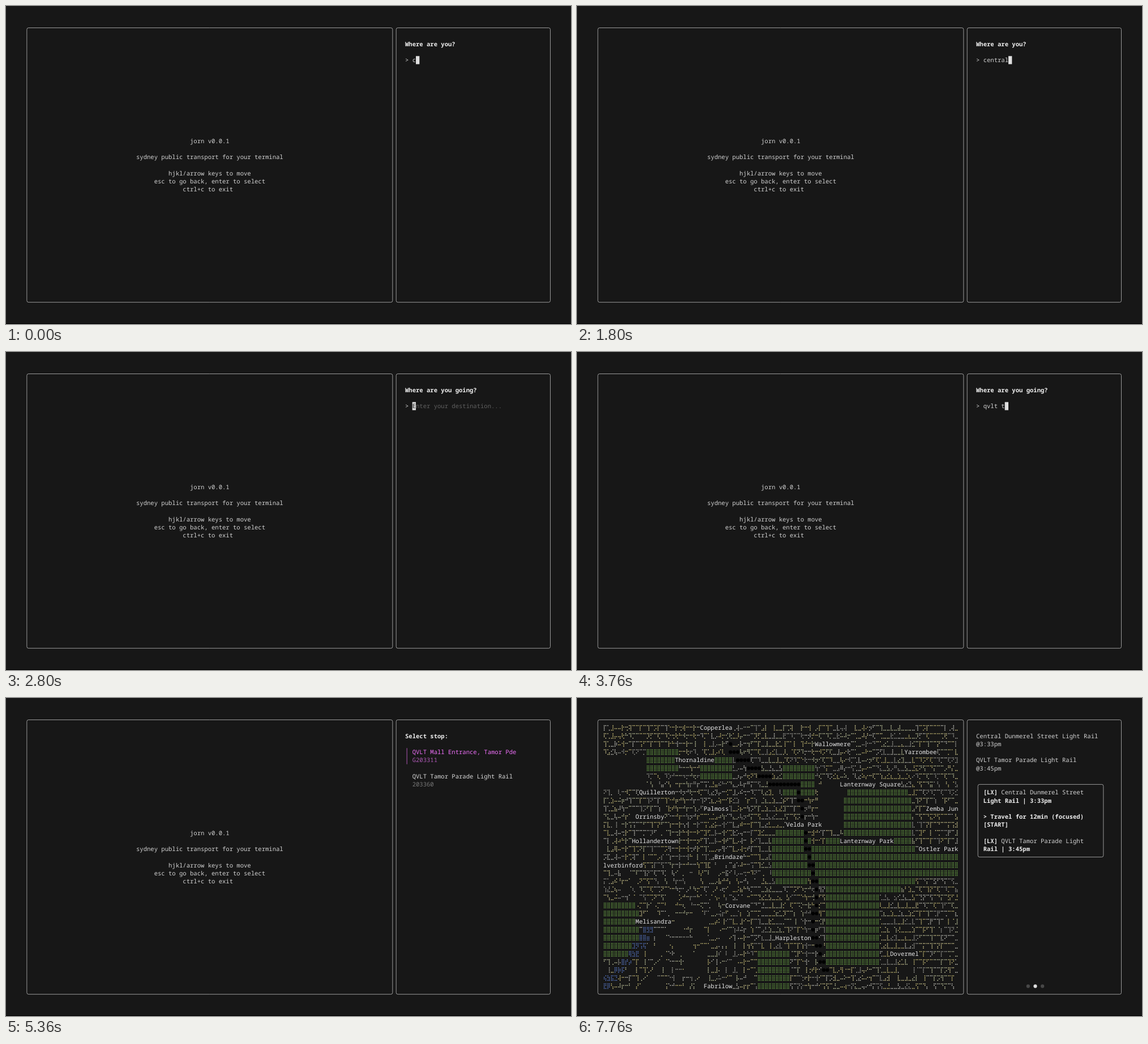
These frames come from a looping animation (998x561 px, 8 s). An HTML page with a canvas:

```html
<!DOCTYPE html>
<html lang="en">
<head>
<meta charset="utf-8">
<title>Transport terminal</title>
<style>
  html, body { margin: 0; width: 100%; height: 100%; overflow: hidden; background: #171717; }
  canvas { display: block; }
</style>
</head>
<body>
<canvas id="stage" width="998" height="561"></canvas>
<script>
const ctx = document.getElementById('stage').getContext('2d');
const LOOP = 8000;
const CELL_W = 19 / 3, CELL_H = 14.24, LEFT = 33.667, TOP = 38.5;
const BG = '#171717', TEXT = '#d2d2d2', BRIGHT = '#eeeeee', LINE = '#c4c4c4';
const PINK = '#ee6ff8', PLUM = '#ad58b4', DIM = '#777777';

const colX = col => LEFT + col * CELL_W;
const midX = col => colX(col + 0.5);
const rowY = row => TOP + row * CELL_H;

// Every glyph sits on the terminal grid.
function write(text, col, row, color = TEXT, bold = false) {
  ctx.font = `${bold ? 'bold ' : ''}${CELL_W / 0.6}px "Noto Sans Mono", monospace`;
  ctx.textRendering = 'geometricPrecision';
  ctx.fillStyle = color;
  [...text].forEach((ch, i) => {
    if (ch !== ' ') ctx.fillText(ch, colX(col + i), rowY(row) + 3.7);
  });
}

function frame(col0, row0, col1, row1) {
  ctx.strokeStyle = LINE;
  ctx.lineWidth = 0.75;
  ctx.beginPath();
  ctx.roundRect(midX(col0), rowY(row0), midX(col1) - midX(col0), rowY(row1) - rowY(row0), 3);
  ctx.stroke();
}

function dot(col, row, radius, color) {
  ctx.fillStyle = color;
  ctx.beginPath();
  ctx.arc(midX(col), rowY(row), radius, 0, Math.PI * 2);
  ctx.fill();
}

function drawIntro() {
  write('jorn v0.0.1', 46, 14);
  write('sydney public transport for your terminal', 31, 16);
  write('hjkl/arrow keys to move', 40, 18);
  write('esc to go back, enter to select', 36, 19);
  write('ctrl+c to exit', 44, 20);
}

function drawPrompt(title, typed, cursorOn, hint) {
  write(title, 106, 2, BRIGHT, true);
  write('> ' + typed, 106, 4);
  const col = 108 + typed.length;
  if (!typed) write(hint, col, 4, '#606060');
  if (cursorOn) {
    ctx.fillStyle = '#e0e0e0';
    ctx.fillRect(colX(col), rowY(4) - CELL_H / 2, CELL_W, CELL_H);
    if (!typed) write(hint[0], col, 4, BG);
  }
}

function drawList(stops, selected, pages = 0) {
  write('Select stop:', 106, 2, BRIGHT, true);
  stops.forEach(([name, id], i) => {
    const row = 4 + i * 3, active = i === selected;
    write(name, 108, row, active ? PINK : '#d8d8d8');
    write(id, 108, row + 1, active ? PLUM : DIM);
    if (active) {
      ctx.fillStyle = PLUM;
      ctx.fillRect(midX(106) - 0.5, rowY(row) - CELL_H / 2, 1, CELL_H * 2);
    }
  });
  for (let i = 0; i < pages; i++) dot(108 + i, 27, 1.3, i ? '#606060' : '#a8a8a8');
}

// Rounded map areas: centre column and row, then half width and half height.
const parks = [
  [76, 11.5, 10, 4.3], [72, 17, 15, 3.2], [86, 17, 14, 1.7], [69, 25, 8, 5],
  [52, 16, 5.5, 3.6], [54, 6.5, 5, 2.5], [16, 4, 4.5, 2], [31, 5, 5, 1.8],
  [4, 25, 6, 3.5], [47, 30, 5, 3]
];
const clearings = [[5, 5.5, 7, 2], [64, 9.5, 4.5, 3]];
const trackPoints = [[35, 2], [35, 3], [46, 6.5], [54, 7.5], [57, 16], [59, 20], [58, 25], [62, 31]];

const labels = [
  ['Copperlea', 27, 0], ['Wallowmere', 59, 2], ['Yarrombee', 84, 3], ['Thornaldine', 20, 4],
  ['Lanternway Square', 66, 7], ['Quillerton', 10, 8], ['Palmoss', 28, 10], ['Zemba Jun', 90, 10],
  ['Orrinsby', 9, 11], ['Velda Park', 51, 12], ['Hollandertown', 8, 14], ['Lanternway Park', 66, 14],
  ['Ostler Park', 88, 15], ['Brindaze', 31, 16], ['lverbinford', 0, 17], ['Corvane', 34, 22],
  ['Melisandra', 9, 24], ['Harpleston', 48, 26], ['Dovermel', 80, 28], ['Fabrilow', 28, 32]
];
const streetColors = ['#ece2a0', '#dcdcd2', '#e2d584', '#b4b4ac', '#d8deb0'];

const within = (areas, c, r) => areas.some(([cx, cy, rx, ry]) =>
  ((c - cx) / rx) ** 4 + ((r - cy) / ry) ** 4 < 1);
const mod = (a, n) => ((a % n) + n) % n;
const hash = (a, b) => mod(Math.sin(a * 127.1 + b * 311.7) * 43758.5453, 1);

function trackCol(row) {
  const next = Math.max(1, trackPoints.findIndex(([, r]) => r >= row));
  const [c0, r0] = trackPoints[next - 1], [c1, r1] = trackPoints[next];
  return c0 + (c1 - c0) * (row - r0) / (r1 - r0);
}

// Streets thin out towards the south-west.
function streetDensity(c, r) {
  if (within(clearings, c, r)) return 0;
  const thinning = Math.min(1, Math.max(0, (r - 15) / 5));
  return 0.9 - 0.5 * thinning * Math.exp(-(((c - 20) / 18) ** 2));
}

// Warped line families, broken into random segments.
function onStreet(u, v, density) {
  const across = v + 0.12 * u + 2.5 * Math.sin(u * 0.09);
  const down = u - 0.2 * v + 2 * Math.sin(v * 0.11);
  const slant = u + 0.9 * v;
  const hit = (line, gap, along, seed) => mod(line, gap) < 1
    && hash(Math.floor(line / gap) + seed, Math.floor(along / 5)) < density;
  return hit(across, 4, u, 0) || hit(down, 5, v, 50) || hit(slant, 15, v, 90);
}

function drawCell(c, r) {
  const park = within(parks, c, r);
  const water = r >= 25 && Math.abs(c - 12 + (r - 25) ** 1.3) < 1.8;
  const density = streetDensity(c, r);
  ctx.fillStyle = water ? '#6286e0' : park ? '#76b74d'
    : streetColors[Math.floor(hash(c >> 1, r + 9) * streetColors.length)];
  for (let i = 0; i < 2; i++) {
    for (let j = 0; j < 4; j++) {
      const u = c * 2 + i, v = r * 4 + j;
      const lit = water ? hash(u, v) < 0.75 : park || onStreet(u, v, density);
      if (lit) ctx.fillRect(colX(c + 2) + 1.1 + i * 2.7, rowY(r + 1) - 4.8 + j * 2.7, 1.45, 1.45);
    }
  }
}

function drawMap() {
  const taken = new Set();
  const key = (c, r) => r * 99 + c;
  for (const [name, col, row] of labels) {
    for (let i = 0; i < name.length; i++) taken.add(key(col + i, row));
    write(name, col + 2, row + 1, '#e6e6e6');
  }
  for (let r = 2; r <= 30; r++) {
    const ends = [trackCol(r - 0.5), trackCol(r + 0.5)].map(Math.round);
    for (let c = Math.min(...ends); c <= Math.max(...ends); c++) {
      if (taken.has(key(c, r))) continue;
      taken.add(key(c, r));
      dot(c + 2, r + 1, 3.1, '#000000');
    }
  }
  for (let r = 0; r < 33; r++) {
    for (let c = 0; c < 99; c++) if (!taken.has(key(c, r))) drawCell(c, r);
  }
}

function drawTrip() {
  write('Central Dunmerel Street Light Rail', 106, 2);
  write('@3:33pm', 106, 3);
  write('QVLT Tamor Parade Light Rail', 106, 5);
  write('@3:45pm', 106, 6);
  frame(106, 8, 141, 17);
  write('[LX]', 108, 9, BRIGHT, true);
  write('Central Dunmerel Street', 113, 9);
  write('Light Rail | 3:33pm', 108, 10, BRIGHT, true);
  write('> Travel for 12min (focused)', 108, 12, BRIGHT, true);
  write('[START]', 108, 13, BRIGHT, true);
  write('[LX]', 108, 15, BRIGHT, true);
  write('QVLT Tamor Parade Light', 113, 15);
  write('Rail | 3:45pm', 108, 16, BRIGHT, true);
  for (let i = 0; i < 3; i++) dot(120 + i * 2, 33, 3.1, i === 1 ? '#dddddd' : '#484848');
}

const origins = [
  ['Central Landing', '200060'], ['Varrowdel Central', 'G2200114'], ['Tolbeck Central', 'G35006'],
  ['Wendalberry Central', 'G300217'], ['Pennow Central School', 'G28435'],
  ['Quorby Central School', 'G248084'], ['Ellow Central Hospital', 'G248128']
];
const destinations = [['QVLT Mall Entrance, Tamor Pde', 'G203311'], ['QVLT Tamor Parade Light Rail', '203360']];
const originKeys = [0, 160, 280, 440, 640, 800, 920];

const typedAt = (t, text, keyTime) => [...text].filter((_, i) => t >= keyTime(i)).join('');

function drawScene(t) {
  ctx.fillStyle = BG;
  ctx.fillRect(0, 0, 998, 561);
  ctx.fillStyle = '#000000';
  ctx.fillRect(0, 560, 998, 1);
  frame(0, 0, 102, 34);
  frame(103, 0, 146, 34);
  if (t >= 7760) {
    drawMap();
    drawTrip();
    return;
  }
  drawIntro();
  if (t < 1920) {
    drawPrompt('Where are you?', typedAt(t, 'central', i => originKeys[i]), t < 1360 || t >= 1800, '');
  } else if (t < 2800) {
    drawList(origins, 0, 4);
  } else if (t < 5360) {
    drawPrompt('Where are you going?', typedAt(t, 'qvlt tamor', i => 2960 + i * 160),
      t < 4800 || t >= 5240, 'Enter your destination...');
  } else {
    drawList(destinations, t < 6280 ? 0 : 1);
  }
}

// All changes fall on a 40 ms grid, so repaint once per step.
let painted = -1;
function tick() {
  const step = Math.floor((performance.now() % LOOP) / 40);
  if (step !== painted) drawScene(step * 40);
  painted = step;
  requestAnimationFrame(tick);
}
tick();
</script>
</body>
</html>
```
